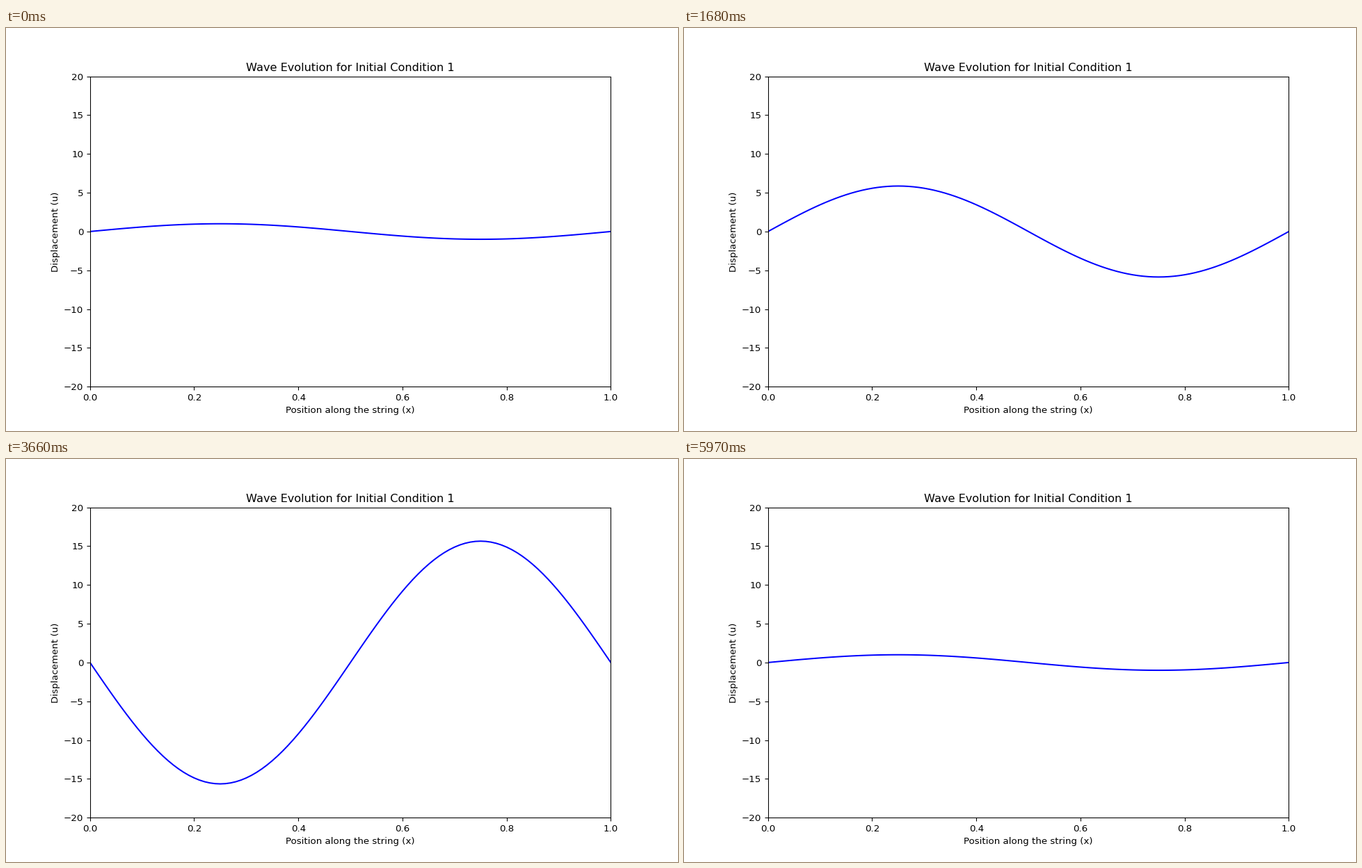
Animation, 966 px wide and 580 px high, one loop 6 s. Source, as a matplotlib script:

```python
import numpy as np
import matplotlib.pyplot as plt
from matplotlib.animation import FuncAnimation

WIDTH, HEIGHT = 966, 580
DPI = 96.6
EPS = 1e-6  # keeps the pixel size from being rounded down
FRAMES = 200
STEP = 2 * np.pi / 100  # phase advance per frame

x = np.linspace(0, 1, 101)
mode = np.sin(2 * np.pi * x)


def amplitude(k):
    """Leapfrog solution of the standing wave; starts from the unit mode."""
    return 1.0 if k == 0 else -np.sin(k * STEP) / np.sin(STEP)


fig, ax = plt.subplots(figsize=((WIDTH + EPS) / DPI, (HEIGHT + EPS) / DPI), dpi=DPI)
line, = ax.plot(x, mode, color="blue")
ax.set_xlim(0, 1)
ax.set_ylim(-20, 20)
ax.set_title("Wave Evolution for Initial Condition 1")
ax.set_xlabel("Position along the string (x)")
ax.set_ylabel("Displacement (u)")


def update(k):
    line.set_ydata(amplitude(k) * mode)
    return line,


anim = FuncAnimation(fig, update, frames=FRAMES, interval=30, repeat=True, repeat_delay=0)
plt.show()
```
